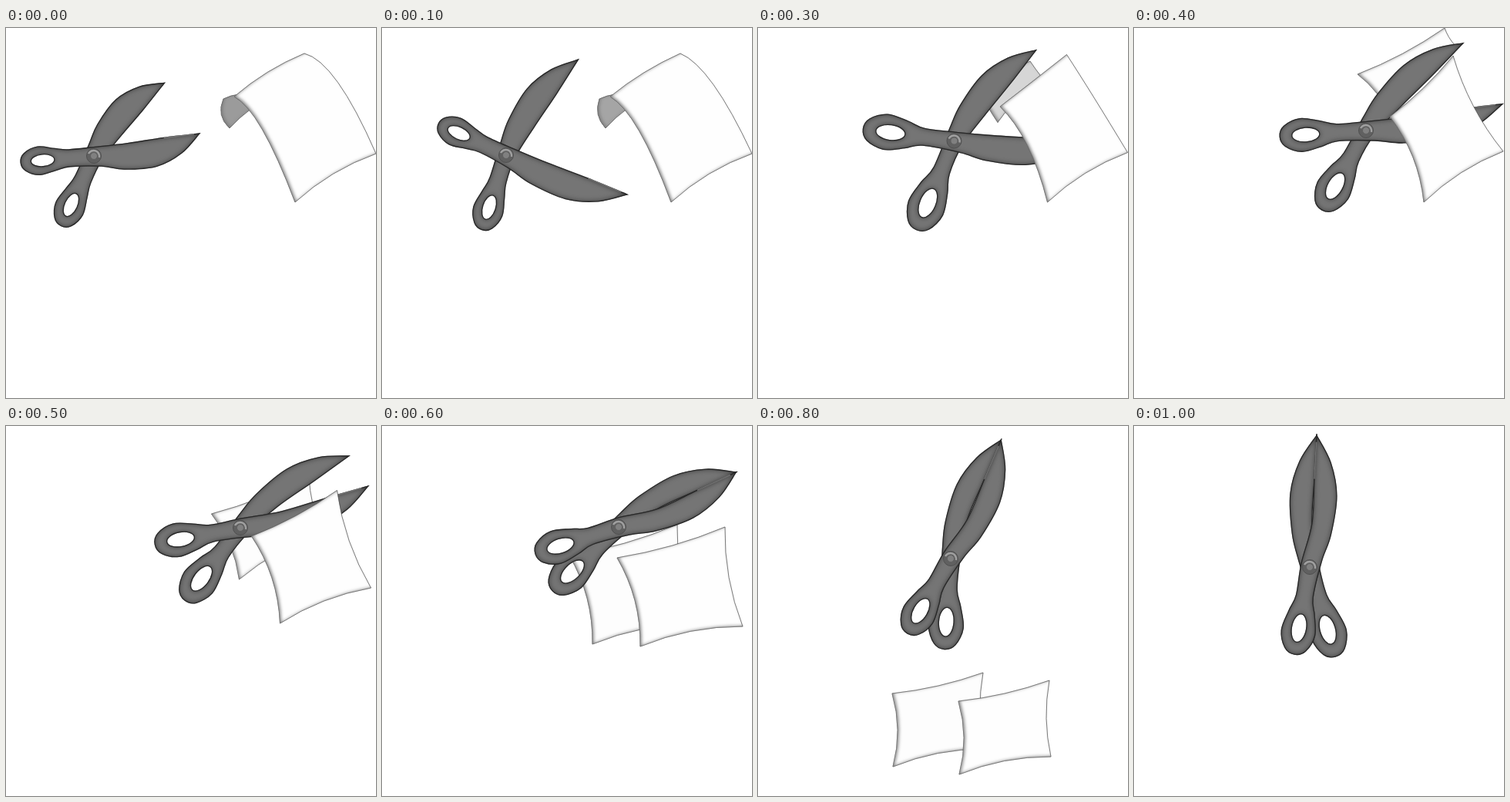
Animation, 480 px wide and 480 px high, one loop 1.1 s. Source, as an HTML page:

```html
<!DOCTYPE html>
<html lang="en">
<head>
<meta charset="utf-8">
<title>Scissors and paper</title>
<style>
  html, body { margin: 0; width: 100%; height: 100%; overflow: hidden; background: #fff; }
  svg { display: block; width: 100vw; height: 100vh; }
</style>
</head>
<body>
<svg viewBox="0 0 480 480">
  <defs>
    <filter id="steel" filterUnits="userSpaceOnUse" x="-20" y="-20" width="520" height="520" color-interpolation-filters="sRGB">
      <feComponentTransfer in="SourceAlpha"><feFuncA type="table" tableValues="1 0"/></feComponentTransfer>
      <feGaussianBlur stdDeviation="3.5"/>
      <feComposite in2="SourceAlpha" operator="in" result="edge"/>
      <feFlood flood-color="#262626"/>
      <feComposite in2="edge" operator="in" result="shade"/>
      <feMerge><feMergeNode in="SourceGraphic"/><feMergeNode in="shade"/></feMerge>
    </filter>
    <filter id="sheet" filterUnits="userSpaceOnUse" x="-20" y="-20" width="520" height="520" color-interpolation-filters="sRGB">
      <feComponentTransfer in="SourceAlpha"><feFuncA type="table" tableValues="1 0"/></feComponentTransfer>
      <feGaussianBlur stdDeviation="2"/>
      <feOffset dx="1.5" dy="-1.5"/>
      <feComposite in2="SourceAlpha" operator="in" result="edge"/>
      <feFlood flood-color="#777"/>
      <feComposite in2="edge" operator="in" result="shade"/>
      <feMerge><feMergeNode in="SourceGraphic"/><feMergeNode in="shade"/></feMerge>
    </filter>
  </defs>
  <path id="back" stroke="#444" stroke-width=".7" filter="url(#sheet)"/>
  <g fill="#757575" fill-rule="evenodd" stroke="#2a2a2a" stroke-width="1.3">
    <path id="far" filter="url(#steel)"/>
    <path id="near" filter="url(#steel)"/>
  </g>
  <path id="glint" fill="none" stroke="#aaa" stroke-width="1.5" opacity=".55"/>
  <path id="front" fill="#fefefe" stroke="#444" stroke-width=".7" filter="url(#sheet)"/>
  <g id="screw">
    <circle r="9.5" fill="#606060" stroke="#505050"/>
    <path d="M-7-3A7.5 7.5 0 0 1 7 2" fill="none" stroke="#a0a0a0" stroke-width="2.5"/>
    <circle r="4.5" fill="#808080" stroke="#606060"/>
  </g>
</svg>
<script>
const STEP = 100, COUNT = 11;
const $ = id => document.getElementById(id);
const setPath = (id, d) => $(id).setAttribute('d', d);
const mix = (a, b, t) => Array.isArray(a) ? a.map((v, i) => mix(v, b[i], t)) : a + (b - a) * t;
const moved = (points, dx, dy) => points.map(([x, y]) => [x + dx, y + dy]);

// Screw position, blade angles in degrees, blade and handle lengths.
const scissors = [
  { at: 0, screw: [114, 166], near: -12, far: -46, blade: 140, handle: 68 },
  { at: 1, screw: [161, 165], near: 18, far: -53, blade: 165, handle: 69 },
  { at: 2, screw: [208, 160], near: 12, far: -54, blade: 157, handle: 90 },
  { at: 4, screw: [301, 133], near: -11, far: -42, blade: 180, handle: 80 },
  { at: 6, screw: [307, 131], near: -25, far: -25, blade: 168, handle: 81 },
  { at: 8, screw: [250, 172], near: -67, far: -67, blade: 167, handle: 80 },
  { at: 10, screw: [228, 183], near: -87, far: -87, blade: 171, handle: 82 }
];

// Corners run clockwise from the top left.
const flap = moved([[-12, 3], [9, -3], [25, 15], [-4, 41]], 294, 89);
const whole = [[296, 89], [387, 33], [480, 163], [375, 226]];
const upper = [[290, 60], [403, 0], [416, 22], [332, 115]];
const lower = [[332, 115], [414, 36], [479, 160], [376, 226]];
const dropped = [[305, 171], [445, 131], [468, 260], [335, 286]];
const landed = [[260, 357], [378, 330], [380, 429], [261, 452]];
const pair = (at, front, dx, dy) => ({ at, front, back: moved(front, dx, dy), curl: 0 });
const paper = [
  { at: 0, back: flap, front: whole, curl: 1 },
  { at: 2, back: flap, front: whole, curl: .8 },
  { at: 4, back: upper, front: lower, curl: 0 },
  pair(6, dropped, -62, -3),
  pair(8, landed, -86, -10),
  pair(10, moved(landed, -150, 240), -86, -10)
];

// How far each edge bends inwards, and where along it the bend sits.
const FLAT = { bow: [.06, .1, .1, .14], lean: [.5, .5, .5, .5] };
const ARCH = { bow: [-.08, -.17, .1, .13], lean: [.5, .2, .5, .8] };
const ROLL = { bow: [-.1, -.1, .05, -.35], lean: [.5, .5, .5, .5] };

function blendAt(keys, step) {
  const i = Math.max(1, keys.findIndex(k => k.at >= step));
  const a = keys[i - 1], b = keys[i], t = (step - a.at) / (b.at - a.at);
  return Object.fromEntries(Object.keys(a).map(k => [k, mix(a[k], b[k], t)]));
}

function sheet(corners, bent, curl) {
  const bow = mix(FLAT.bow, bent.bow, curl), lean = mix(FLAT.lean, bent.lean, curl);
  return corners.reduce((d, [x, y], i) => {
    const end = corners[(i + 1) % 4], dx = end[0] - x, dy = end[1] - y;
    return d + `Q${x + dx * lean[i] - dy * bow[i]} ${y + dy * lean[i] + dx * bow[i]} ${end}`;
  }, 'M' + corners[0]) + 'Z';
}

// Smooth curve through the points with a sharp corner at the first one.
function outline(points) {
  const pts = [...points, points[0]], last = pts.length - 1;
  let d = 'M' + pts[0];
  for (let i = 0; i < last; i++) {
    const p = pts[Math.max(0, i - 1)], a = pts[i], b = pts[i + 1], n = pts[Math.min(last, i + 2)];
    d += `C${a.map((v, k) => v + (b[k] - p[k]) / 6)} ${b.map((v, k) => v - (n[k] - a[k]) / 6)} ${b}`;
  }
  return d + 'Z';
}

function hole([x, y], rx, ry, turn) {
  const r = turn * Math.PI / 180, dx = rx * Math.cos(r), dy = rx * Math.sin(r);
  const arc = (ex, ey) => `A${rx} ${ry} ${turn} 0 1 ${ex} ${ey}`;
  return `M${x - dx} ${y - dy}` + arc(x + dx, y + dy) + arc(x - dx, y - dy) + 'Z';
}

// Point reached by going along a direction from the origin, then sideways.
function offset([x, y], degrees, along, aside) {
  const r = degrees * Math.PI / 180, c = Math.cos(r), s = Math.sin(r);
  return [x + c * along - s * aside, y + s * along + c * aside];
}

// Cutting edge, handle ring, belly; side tells which way the belly faces.
function half(screw, angle, length, handle, splay, side, cut) {
  const turn = angle + 180 + splay, r = handle * .42;
  const blade = (t, w) => offset(screw, angle, t * length, side * w);
  const grip = (t, w) => offset(screw, turn, t * handle, -side * w);
  const points = [
    blade(1, 0), blade(.67, -cut * .6), blade(.33, -cut), blade(.03, -11),
    grip(.48, -11), grip(.75, -r * .5), grip(1.08, -r * .65), grip(1.35, -r * .4),
    grip(1.43, 0), grip(1.35, r * .4), grip(1.08, r * .65), grip(.75, r * .5), grip(.48, 11),
    blade(.05, 15), blade(.25, 25), blade(.55, 30), blade(.8, 20)
  ];
  return { points, d: outline(points) + hole(grip(1, 0), handle * .23, handle * .12, turn) };
}

function draw(step) {
  const s = blendAt(scissors, step), p = blendAt(paper, step);
  const open = Math.min(1, (s.near - s.far) / 30), cut = 7 * open;
  const near = half(s.screw, s.near, s.blade, s.handle * .98, 7, 1, cut);
  const far = half(s.screw, s.far, s.blade * (1 - .06 * open), s.handle * 1.03, -19, -1, cut);
  setPath('near', near.d);
  setPath('far', far.d);
  const [tip, edge] = near.points;
  setPath('glint', `M${mix(tip, edge, .15)}L${edge}`);
  setPath('back', sheet(p.back, ROLL, p.curl));
  setPath('front', sheet(p.front, ARCH, p.curl));
  const tone = Math.round(mix(253, 155, p.curl));
  $('back').setAttribute('fill', `rgb(${tone},${tone},${tone})`);
  $('screw').setAttribute('transform', `translate(${s.screw})`);
}

const start = performance.now();
let shown = -1;
function tick() {
  const step = Math.floor((performance.now() - start) / STEP) % COUNT;
  if (step !== shown) draw(shown = step);
  requestAnimationFrame(tick);
}
tick();
</script>
</body>
</html>
```
